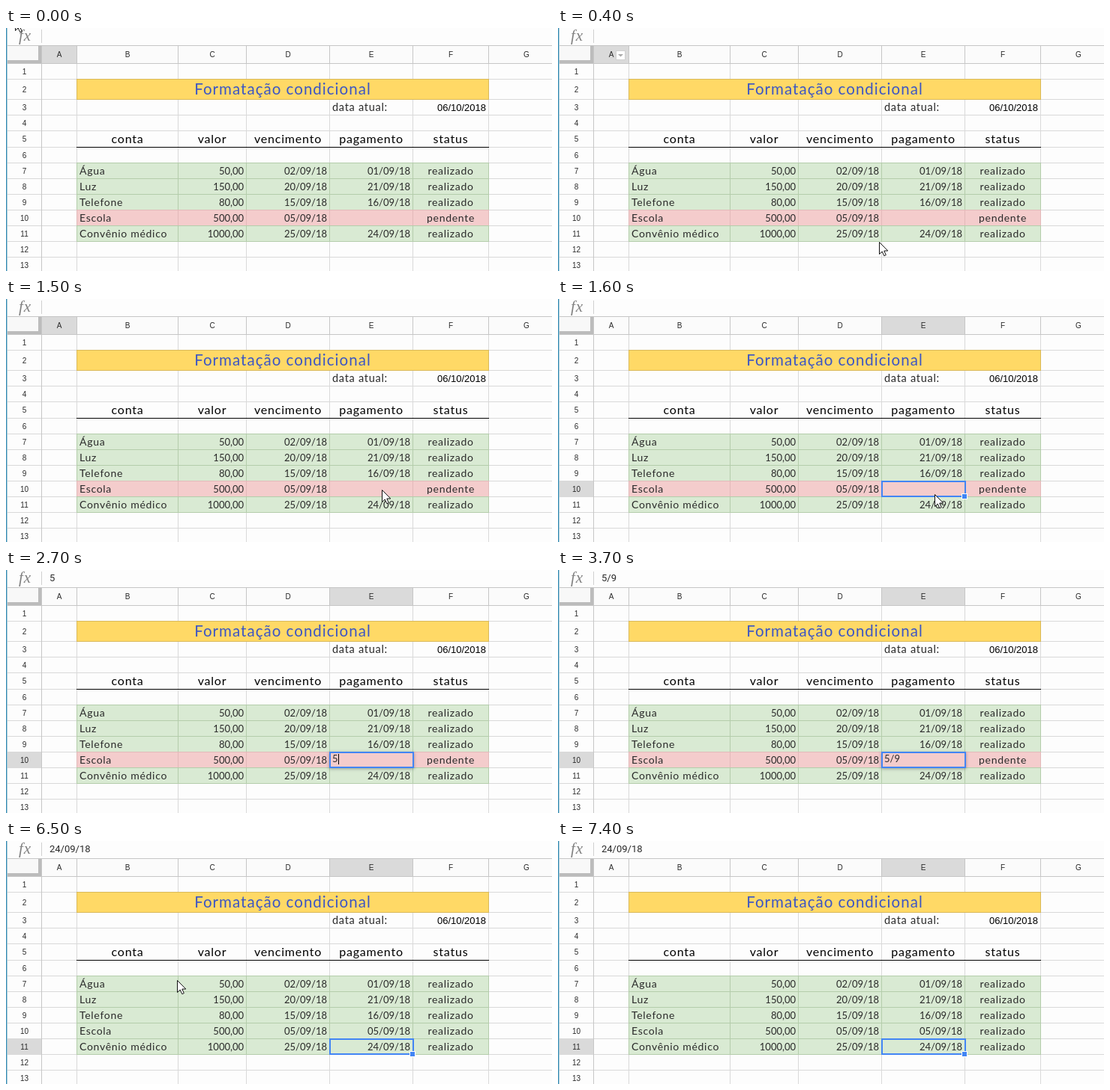
An HTML page with a canvas for the animation above (7.5 s loop, 728x325 px).

```html
<!DOCTYPE html>
<html lang="pt">
<head>
<meta charset="utf-8">
<title>Formatação condicional</title>
<style>
  html, body { margin: 0; width: 100%; height: 100%; overflow: hidden; background: #fdfdfd; }
  canvas { display: block; }
</style>
</head>
<body>
<canvas width="728" height="325"></canvas>
<script>
const ctx = document.querySelector('canvas').getContext('2d');
const LOOP = 7500;
const COLS = [47, 94, 229, 320, 431, 542, 643, 744];
const ROWS = [47, 68, 95, 116, 137, 159, 180, 201, 222, 243, 264, 285, 306, 327];
const BLUE = '#4285f4';
const GREEN = { fill: '#d9ead3', line: '#b4cdab' };
const PINK = { fill: '#f4cccc', line: '#e2b9b9' };
const ROUND = 'Lato, sans-serif';
const PLAIN = '"Liberation Sans", Arial, sans-serif';
const BILLS = [
  ['Água', '50,00', '02/09/18', '01/09/18'],
  ['Luz', '150,00', '20/09/18', '21/09/18'],
  ['Telefone', '80,00', '15/09/18', '16/09/18'],
  ['Escola', '500,00', '05/09/18', '05/09/18'],
  ['Convênio médico', '1000,00', '25/09/18', '24/09/18'],
];

// Pointer stops: time, x, y; a stop without a position hides it.
const POINTER = [
  [0, 12, -13], [100, 34, 12], [200, 76, 36], [300, 262, 172], [400, 428, 286],
  [500, 510, 280], [600, 572, 264], [700, 606, 254], [800, 616, 250],
  [1100, 604, 252], [1200, 578, 254], [1300, 544, 255], [1400, 516, 255],
  [1500, 501, 255], [1600, 502, 261], [2700],
  [6500, 228, 186], [6600, 224, 104], [6700, 219, 28], [6800],
];
const ENTRY = [[1600, ''], [2700, '5'], [3000, '5/'], [3200, '5/9']];

const latest = (steps, t) => steps.filter(step => step[0] <= t).pop();

function box(x, y, w, h, color) {
  ctx.fillStyle = color;
  ctx.fillRect(x, y, w, h);
}

function text(str, x, y, { size = 14, font = ROUND, align = 'left', color = '#2a2a2a', spacing = 0, style = '' } = {}) {
  ctx.font = `${style} ${size}px ${font}`;
  ctx.letterSpacing = `${spacing * size}px`;
  ctx.textAlign = align;
  ctx.fillStyle = color;
  ctx.fillText(str, x, y);
}

const label = (str, x, y, options) => text(str, x, y, { spacing: 0.05, ...options });
const middle = (edges, i) => (edges[i] + edges[i + 1] + 1) / 2;

function drawGrid(col, row) {
  box(0, 0, 728, 325, '#fdfdfd');
  for (const x of COLS) box(x, 47, 1, 278, '#d9d9d9');
  for (const y of ROWS) box(2, y, 726, 1, '#d9d9d9');

  box(2, 24, 726, 23, '#fbfbfb');
  box(COLS[col], 24, COLS[col + 1] - COLS[col], 23, '#dadada');
  if (row >= 0) box(2, ROWS[row] + 1, 45, ROWS[row + 1] - ROWS[row] - 1, '#dadada');
  box(2, 23, 726, 1, '#c6c6c6');
  box(2, 47, 726, 1, '#c6c6c6');
  for (const x of COLS) box(x, 23, 1, 25, '#c6c6c6');
  box(47, 47, 1, 278, '#c6c6c6');
  box(2, 24, 45, 23, '#f8f8f8');
  box(2, 43, 45, 4, '#bcbcbc');
  box(43, 24, 4, 23, '#bcbcbc');

  const header = { size: 10, font: PLAIN, align: 'center' };
  [...'ABCDEFG'].forEach((name, i) => text(name, middle(COLS, i), 39, header));
  for (let i = 0; i < 13; i++) text(i + 1, 24.5, Math.floor(middle(ROWS, i)) + 4, header);
}

function drawFormulaBar(content) {
  text('fx', 17, 17, { size: 21, font: '"Liberation Serif", serif', style: 'italic', color: '#808080', spacing: 0.04 });
  box(47, 2, 1, 18, '#d0d0d0');
  text(content, 58, 15, { size: 13, font: 'Roboto, sans-serif' });
}

function drawHeadings() {
  box(94, 68, 550, 28, '#d9b95a');
  box(95, 69, 548, 26, '#ffd966');
  label('Formatação condicional', 369, 89, { size: 20.5, align: 'center', color: '#3c56c4' });
  label('data atual:', 435, 111, { size: 14.5 });
  text('06/10/2018', 640, 111, { size: 13, font: PLAIN, align: 'right', color: '#000' });
  ['conta', 'valor', 'vencimento', 'pagamento', 'status'].forEach((name, i) =>
    label(name, middle(COLS, i + 1), 154, { size: 16, align: 'center', color: '#000' }));
  box(94, 159, 550, 1, '#000');
}

function drawBills(paid) {
  BILLS.forEach(([name, value, due, payment], i) => {
    const pending = i === 3 && !paid;
    const { fill, line } = pending ? PINK : GREEN;
    const top = ROWS[i + 6];
    const number = { size: 13, align: 'right' };
    box(94, top, 550, 22, line);
    for (let c = 1; c < 6; c++) box(COLS[c] + 1, top + 1, COLS[c + 1] - COLS[c] - 1, 20, fill);
    label(name, 98, top + 16);
    text(value, 317, top + 16, number);
    text(due, 428, top + 16, number);
    if (!pending) text(payment, 539, top + 16, number);
    label(pending ? 'pendente' : 'realizado', 593, top + 16, { align: 'center' });
  });
}

function drawSelection(row) {
  const y = ROWS[row];
  ctx.strokeStyle = BLUE;
  ctx.lineWidth = 2;
  ctx.strokeRect(432, y + 1, 111, 20);
  box(538, y + 17, 8, 8, '#fff');
  box(539, y + 18, 6, 6, BLUE);
}

function drawEditor(content, caret) {
  ctx.save();
  ctx.shadowColor = 'rgba(60, 64, 67, .45)';
  ctx.shadowBlur = 4;
  ctx.shadowOffsetY = 1;
  box(431, 243, 113, 22, BLUE);
  ctx.restore();
  box(433, 245, 109, 18, PINK.fill);
  text(content, 435, 257, { size: 13 });
  if (caret) box(Math.round(435 + ctx.measureText(content).width), 246, 1, 14, '#000');
}

function drawMenuButton(x) {
  box(x, 30, 13, 13, '#d0d0d0');
  box(x + 1, 31, 11, 11, '#fff');
  ctx.fillStyle = '#aaa';
  ctx.beginPath();
  ctx.moveTo(x + 3, 35);
  ctx.lineTo(x + 10, 35);
  ctx.lineTo(x + 6.5, 38.5);
  ctx.fill();
}

function drawPointer(x, y) {
  const arrow = new Path2D('M.5 .5V16.5L4.2 13L6.8 18.7L9.3 17.6L6.8 12H11.8Z');
  ctx.save();
  ctx.translate(x, y);
  ctx.fillStyle = '#fff';
  ctx.fill(arrow);
  ctx.strokeStyle = '#111';
  ctx.lineWidth = 1;
  ctx.stroke(arrow);
  ctx.restore();
}

function draw(t) {
  const selected = t >= 1600;
  const paid = t >= 4000;
  const entry = selected && !paid ? latest(ENTRY, t)[1] : '';

  drawGrid(selected ? 4 : 0, paid ? 10 : selected ? 9 : -1);
  drawFormulaBar(paid ? '24/09/18' : entry);
  drawHeadings();
  drawBills(paid);
  if (entry) drawEditor(entry, t < 3700);
  else if (selected) drawSelection(paid ? 10 : 9);

  if (t >= 200 && t < 500) drawMenuButton(77);
  if (t >= 6700 && t < 7000) drawMenuButton(212);
  box(0, 0, 1, 325, '#3a8fb7');
  box(1, 0, 1, 325, '#a5c8d6');

  const [, x, y] = latest(POINTER, t);
  if (x !== undefined) drawPointer(x, y);
}

function frame() {
  draw(performance.now() % LOOP);
  requestAnimationFrame(frame);
}
frame();
</script>
</body>
</html>
```
